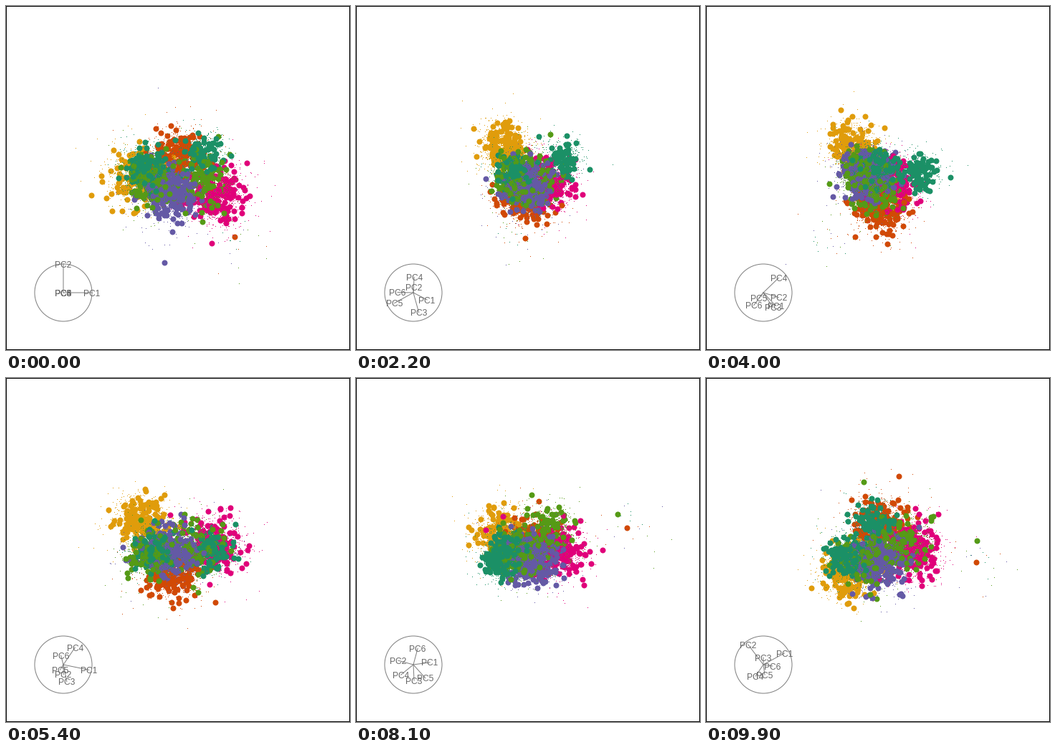
A matplotlib script that plays this animation: 480x480 px, repeating every 10 s.

```python
import numpy as np
import matplotlib.pyplot as plt
from matplotlib.animation import FuncAnimation
from matplotlib.patches import Circle, Rectangle

SIZE, DPI, FRAMES = 480, 80, 100
PX = 72 / DPI    # points per pixel
GREY = "#7f7f7f"
HUB, RADIUS = np.array([80, 400]), 40
MIDDLE = np.array([240, 240])
FLIP = np.array([1, -1])
SLICE = 1.6      # squared distance from the plane that counts as inside
CHUNKS = 5       # slices of each cloud that interleave in depth
DECAY = np.linspace(1.15, .9, 6)  # later components vary less

rng = np.random.default_rng(11)

# Key poses of the tour: second, then the x and y weights of the six axes.
poses = [
    (0.0, [1, 0, 0, 0, 0, 0], [0, 1, 0, 0, 0, 0]),
    (2.2, [.475, .01, .19, .03, -.66, -.55], [-.25, .18, -.7, .55, -.37, .01]),
    (4.0, [.43, .53, .33, .53, -.16, -.33], [-.47, -.17, -.53, .53, -.2, -.45]),
    (5.4, [.9, .01, .13, .4, -.11, -.09], [-.2, -.35, -.6, .6, -.18, .33]),
    (6.5, [.65, -.45, -.1, 0, .6, .12], [-.1, -.3, -.475, .48, -.33, .58]),
    (8.1, [.575, -.53, .03, -.43, .42, .15], [.075, .15, -.55, -.35, -.47, .57]),
    (9.9, [.73, -.53, 0, -.27, .05, .32], [.4, .7, .25, -.4, -.35, -.05]),
]
times = np.array([p[0] for p in poses])
bases = np.array([np.transpose(p[1:]) for p in poses])
slopes = np.gradient(bases, times, axis=0)


def plane(t):
    """Projection basis at time t: Hermite curve, then made orthonormal."""
    i = min(np.searchsorted(times, t, side="right") - 1, len(times) - 2)
    h = times[i + 1] - times[i]
    u = (t - times[i]) / h
    mix = ((1 + 2 * u) * (1 - u) ** 2 * bases[i]
           + u * (1 - u) ** 2 * h * slopes[i]
           + u * u * (3 - 2 * u) * bases[i + 1]
           + u * u * (u - 1) * h * slopes[i + 1])
    left, _, right = np.linalg.svd(mix, full_matrices=False)
    return left @ right


fig = plt.figure(figsize=(SIZE / DPI, SIZE / DPI), dpi=DPI, facecolor="white")
ax = fig.add_axes([0, 0, 1, 1])
ax.set(xlim=(0, SIZE), ylim=(SIZE, 0))
ax.axis("off")


class Cloud:
    """Normal cloud in six dimensions, large dots inside the slice.

    The slice passes through the cloud itself, or through the middle of
    all data if the cloud is remote.
    """

    def __init__(self, color, depth, count, spread, centre, jitter=1, remote=False):
        far = np.where(rng.random(count) < .12, 1.7, 1.0)
        z = rng.normal(size=(count, 6)) * far[:, None] * jitter
        self.points = np.array(centre) + z * spread * DECAY
        self.z = z + np.array(centre) / spread if remote else z
        self.norm = (self.z ** 2).sum(axis=1)
        self.layers = []
        for k in range(min(CHUNKS, count)):
            order = depth + .5 * k
            dot, = ax.plot([], [], "o", ms=8 * PX, mew=0, color=color, zorder=order)
            pixel, = ax.plot([], [], ",", color=color, zorder=order + .01)
            self.layers.append((dot, pixel))

    def update(self, basis):
        inside = self.norm - ((self.z @ basis) ** 2).sum(axis=1) < SLICE
        pos = MIDDLE + self.points @ basis * FLIP
        n = len(self.layers)
        for k, (dot, pixel) in enumerate(self.layers):
            p, near = pos[k::n], inside[k::n]
            dot.set_data(*p[near].T)
            pixel.set_data(*p[~near].T)


YELLOW, ORANGE, PINK = "#e09c0b", "#d14905", "#e0007a"
PURPLE, GREEN, TEAL = "#6459a5", "#559a16", "#1b9066"
REMOTE = (79, -82, 0, -60, 35, 55)

clouds = [
    Cloud(YELLOW, 0, 850, 16, (-55, 1, -32, 9, -11, 15)),
    Cloud(ORANGE, .8, 900, 16, (0, 30, 27, -26, -2, 25)),
    Cloud(PINK, 1.2, 850, 17, (56, -26, -11, 9, 0, -10)),
    Cloud(PURPLE, 2.2, 1500, 16, (-11, -21, 7, -6, 3, -12)),
    Cloud(GREEN, 2.4, 700, 15, (-36, -4, 7, -11, 5, -2)),
    Cloud(GREEN, 2.1, 650, 16, (36, -5, -24, -13, -2, 10)),
    Cloud(TEAL, 2.6, 650, 12, (-45, 14, 20, 13, 0, 3)),
    Cloud(TEAL, 2.5, 450, 12, (33, 35, -2, 25, -36, -18)),
    Cloud(ORANGE, 4, 1, 75, REMOTE, jitter=0, remote=True),
]
clouds += [Cloud(c, 4, 6, 20, REMOTE, remote=True)
           for c in (ORANGE, PURPLE, TEAL, GREEN)]

ax.add_patch(Rectangle((.5, .5), SIZE - 1, SIZE - 1, fill=False,
                       ec="black", lw=PX, snap=False, zorder=9))
ax.add_patch(Circle(HUB, RADIUS, fill=False, ec=GREY, lw=PX, zorder=9))
spokes = [ax.plot([], [], color=GREY, lw=PX, snap=False, zorder=9)[0]
          for _ in range(6)]
labels = [ax.text(0, 0, f"PC{i + 1}", family="Liberation Sans", size=12 * PX,
                  color="#666666", ha="center", va="baseline", zorder=10)
          for i in range(6)]


def draw(frame):
    basis = plane(frame / 10)
    for cloud in clouds:
        cloud.update(basis)
    for tip, spoke, label in zip(HUB + RADIUS * basis * FLIP, spokes, labels):
        spoke.set_data(*zip(HUB, tip))
        label.set_position(tip + [0, 4.6])
    return []


anim = FuncAnimation(fig, draw, frames=FRAMES, interval=100,
                     repeat=True, repeat_delay=0)
plt.show()
```
